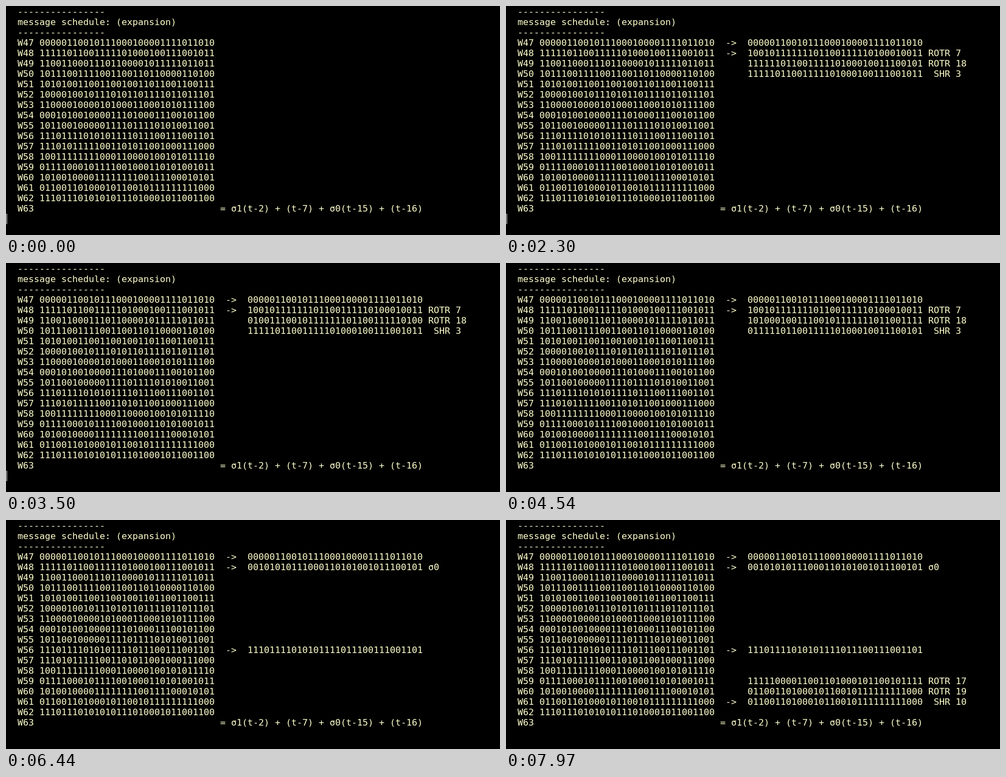
Animation, 902 px wide and 420 px high, one loop 8000 ms. Source, as an HTML page:

```html
<!DOCTYPE html>
<html lang="en">
<head>
<meta charset="utf-8">
<title>Message schedule</title>
<style>
html, body { margin: 0; width: 100%; height: 100%; overflow: hidden; background: #000; }
#screen {
  position: absolute; left: 1px; top: 1px; margin: 0;
  font: 16.6px/19px "DejaVu Sans Mono", monospace;
  letter-spacing: calc(10px - 1ch);
  color: #ffffcc;
}
#cursor { position: absolute; left: 1px; top: 381px; width: 1px; height: 19px; background: #fff; }
</style>
</head>
<body>
<pre id="screen"></pre>
<div id="cursor"></div>
<script>
const LOOP = 8000, FIRST = 47, LAST = 63;

const rotr = (x, n) => n ? (x >>> n | x << 32 - n) >>> 0 : x;
const bits = x => x.toString(2).padStart(32, "0");

// SHA-256 message schedule of a one-block text
function schedule(text) {
  const w = Array(16).fill(0);
  [...text + "\x80"].forEach((c, i) => w[i >> 2] |= c.charCodeAt(0) << 24 - i % 4 * 8);
  w[15] = text.length * 8;
  const s0 = x => rotr(x, 7) ^ rotr(x, 18) ^ x >>> 3;
  const s1 = x => rotr(x, 17) ^ rotr(x, 19) ^ x >>> 10;
  for (let t = 16; t < LAST; t++) w[t] = s1(w[t - 2]) + w[t - 7] + s0(w[t - 15]) + w[t - 16] >>> 0;
  return w;
}
const W = schedule("abc");

// Steps done at time t: one per 100 ms from start on
const steps = (t, start, max) => Math.max(0, Math.min(max, Math.floor((t - start) / 100) + 1));

// Program time, which now and then falls a little behind the clock
const programTime = t => t - (t >= 1770 ? 30 : 0) - (t >= 3570 ? 40 : 0) - (t >= 6840 ? 30 : 0);

// What stands right of the word list, by word number
function notes(t) {
  const out = {};
  const put = (n, word, label = "", arrow = "  ") => out[n] = `  ${arrow}  ${bits(word >>> 0)} ${label}`;
  if (t >= 370) put(47, W[47], "", "->");
  if (t >= 770) {
    const a = rotr(W[48], steps(t, 1170, 7));
    const b = rotr(W[48], steps(t, 2270, 18));
    const c = W[48] >>> steps(t, 4470, 3);
    if (t < 5570) {
      put(48, a, "ROTR 7", "->");
      put(49, b, "ROTR 18");
      if (t < 5170) put(50, c, " SHR 3");
    } else if (t < 5970) {
      put(48, a, "", "->");
      put(49, b ^ c, "XOR");
    } else put(48, a ^ b ^ c, "σ0", "->");
  }
  if (t >= 6370) put(56, W[56], "", "->");
  if (t >= 6770) {
    put(59, rotr(W[61], steps(t, 7170, 17)), "ROTR 17");
    put(60, W[61], "ROTR 19");
    put(61, W[61], " SHR 10", "->");
  }
  return out;
}

const screen = document.getElementById("screen");
const cursor = document.getElementById("cursor");
const rule = "  " + "-".repeat(16);
let shown = "";

function draw(t) {
  const side = notes(programTime(t));
  const lines = [rule, "  message schedule: (expansion)", rule];
  for (let n = FIRST; n < LAST; n++) lines.push(`  W${n} ${bits(W[n])}${side[n] || ""}`);
  lines.push(`  W${LAST}`.padEnd(39) + "= σ1(t-2) + (t-7) + σ0(t-15) + (t-16)");
  const text = lines.join("\n");
  if (text !== shown) screen.textContent = shown = text;
  cursor.style.visibility = Math.floor((t + 230) / 600) % 2 ? "hidden" : "visible";
}

const begin = performance.now();
function tick() {
  draw((performance.now() - begin) % LOOP);
  requestAnimationFrame(tick);
}
tick();
</script>
</body>
</html>
```
